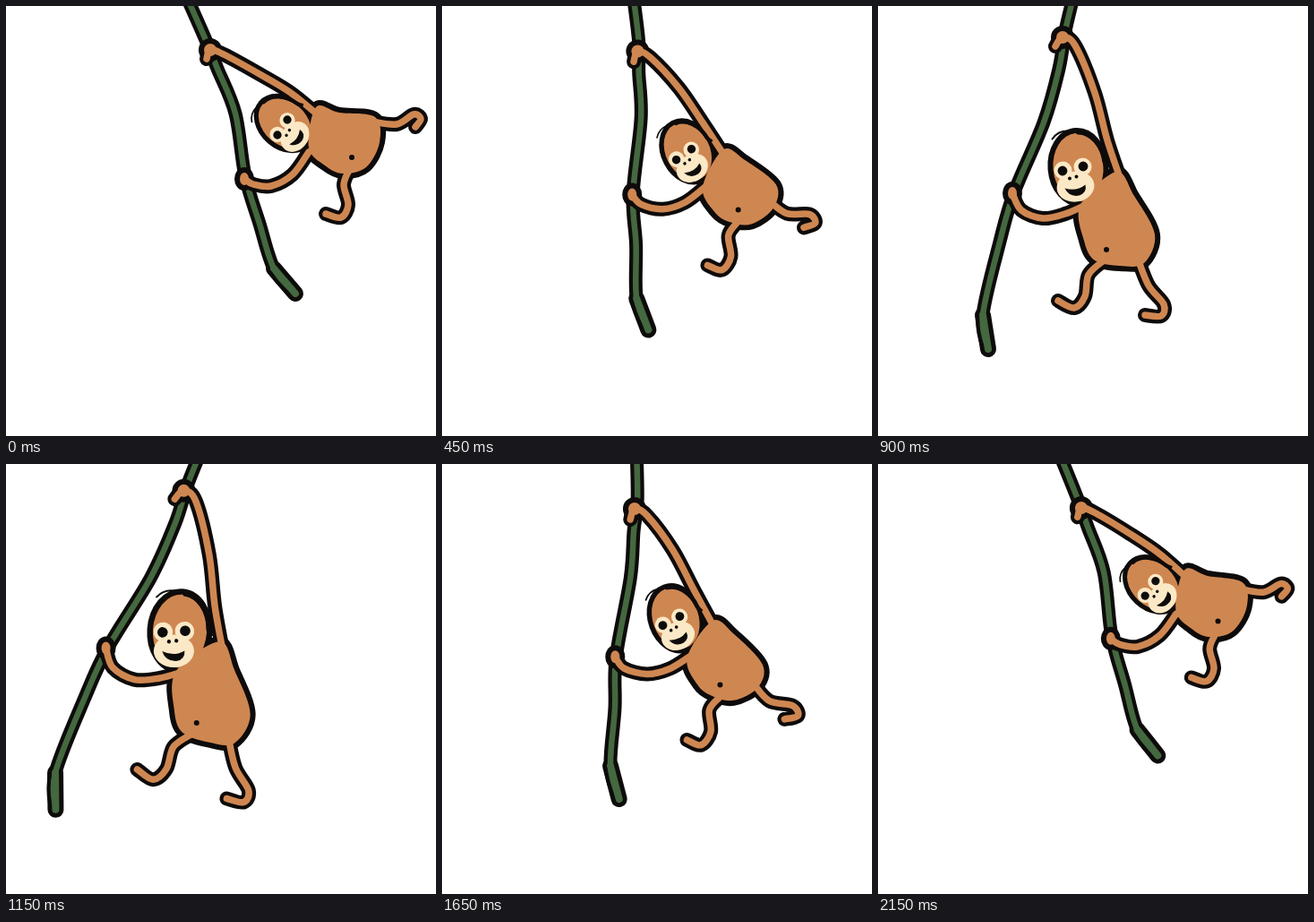
An HTML page with a canvas for the animation above (2200 ms loop, 480x480 px).

```html
<!DOCTYPE html>
<html>
<head>
<meta charset="utf-8">
<style>
html, body { margin: 0; width: 100%; height: 100%; overflow: hidden; background: #fff; }
canvas { display: block; width: 480px; height: 480px; }
</style>
</head>
<body>
<canvas id="stage" width="480" height="480"></canvas>
<script>
const ctx = document.getElementById('stage').getContext('2d');
const BLACK = '#0e0b0b', FUR = '#cf8751', CREAM = '#fbe8c6', GREEN = '#44683f';
const LOOP = 2200, STEP = 50;

// Swing position over time, and the swing positions of the key poses
const TIMES = [0, 250, 650, 900, 1100, 1450, 1850, 2150, 2200];
const SWINGS = [0, 205, 668, 900, 1100, 769, 406, 50, 0];
const KEYS = [0, 668, 900, 1100];

// The far-left pose is the third pose turned and enlarged about the top hand
function farLeft(pts) {
  const c = Math.cos(.192) * 1.1, s = Math.sin(.192) * 1.1;
  return pts.map((v, i) => {
    const j = i - i % 2, x = pts[j] - 207, y = pts[j + 1] - 40;
    return i % 2 ? 34 + x * s + y * c : 196 + x * c - y * s;
  });
}
const part = (right, mid, left) => [right, mid, left, farLeft(left)];

const rope = part(
  [200,-14, 223,38, 236,70, 256,120, 267,190, 283,243, 299,293, 323,321],
  [219,-14, 217,40, 211,75, 204,128, 184,218, 180,275, 172,342, 180,380],
  [219,-14, 209,28, 202,70, 185,130, 152,208, 136,263, 117,345, 123,383]);
const upperArm = part(
  [224,59, 228,49, 243,54, 283,76, 318,97, 352,125],
  [208,61, 213,49, 227,57, 254,98, 276,146, 300,195],
  [198,45, 206,35, 220,44, 242,97, 256,150, 273,200]);
const lowerArm = part(
  [266,193, 276,199, 296,201, 320,188, 338,163],
  [183,217, 193,231, 219,238, 244,233, 268,220],
  [150,209, 160,228, 184,237, 209,232, 232,222]);
const body = part(
  [338,158, 356,178, 376,187, 402,180, 417,152, 412,124, 372,119, 346,113],
  [264,222, 274,254, 290,268, 314,274, 342,262, 349,236, 318,198, 295,182],
  [226,222, 230,262, 242,284, 270,290, 297,287, 309,255, 286,212, 266,185]);
const leftLeg = part(
  [382,185, 377,200, 382,222, 374,236, 357,232],
  [298,270, 286,284, 287,308, 276,323, 260,317],
  [252,284, 235,300, 231,324, 219,337, 201,329]);
const rightLeg = part(
  [408,129, 436,132, 455,121, 463,126, 457,135],
  [338,260, 354,281, 380,289, 385,301, 369,304],
  [290,282, 302,312, 319,333, 316,346, 298,345]);
const eyes = part([303,144, 314,127], [238,184, 258,175], [206,184, 229,179]);
const navel = part([386,169], [299,256], [255,272]);

function swingAt(t) {
  let i = 0;
  while (t >= TIMES[i + 1]) i++;
  const f = (t - TIMES[i]) / (TIMES[i + 1] - TIMES[i]);
  return SWINGS[i] + f * (SWINGS[i + 1] - SWINGS[i]);
}

// Smooth blend of the key poses at swing u, as [x, y] points
function pose(keys, u) {
  let i = 0;
  while (i < 2 && u > KEYS[i + 1]) i++;
  const d = KEYS[i + 1] - KEYS[i], f = (u - KEYS[i]) / d, g = 1 - f;
  const slope = (k, n) => {
    const a = Math.max(k - 1, 0), b = Math.min(k + 1, 3);
    return (keys[b][n] - keys[a][n]) / (KEYS[b] - KEYS[a]) * d;
  };
  const flat = keys[0].map((_, n) =>
    keys[i][n] * (1 + 2 * f) * g * g + slope(i, n) * f * g * g +
    keys[i + 1][n] * (3 - 2 * f) * f * f - slope(i + 1, n) * f * f * g);
  const pts = [];
  for (let n = 0; n < flat.length; n += 2) pts.push([flat[n], flat[n + 1]]);
  return pts;
}

function curve(p, closed) {
  const n = p.length;
  const at = i => closed ? p[(i + n) % n] : p[Math.max(0, Math.min(n - 1, i))];
  const path = new Path2D();
  path.moveTo(...p[0]);
  for (let i = 0; i < (closed ? n : n - 1); i++) {
    const [a, b, c, d] = [at(i - 1), at(i), at(i + 1), at(i + 2)];
    path.bezierCurveTo(b[0] + (c[0] - a[0]) / 6, b[1] + (c[1] - a[1]) / 6,
      c[0] - (d[0] - b[0]) / 6, c[1] - (d[1] - b[1]) / 6, c[0], c[1]);
  }
  return path;
}

function stroke(path, color, width) {
  ctx.strokeStyle = color;
  ctx.lineWidth = width;
  ctx.stroke(path);
}

function fill(path, color) {
  ctx.fillStyle = color;
  ctx.fill(path);
}

function oval(x, y, rx, ry = rx, turn = 0, from = 0, to = 7) {
  const path = new Path2D();
  path.ellipse(x, y, rx, ry, turn, from, Math.min(to, from + 2 * Math.PI));
  return path;
}

function drawFace() {
  for (const [x, y] of [[-11, 2], [11, -2]]) fill(oval(x, y, 10), CREAM);
  fill(oval(3, 20, 21, 17, -.15), CREAM);
  for (const [x, y] of [[-11.5, 2.5], [11.5, -2.5]]) fill(oval(x, y, 5.4), BLACK);
  fill(oval(-3.5, 11, 2), BLACK);
  fill(oval(4, 9, 2), BLACK);
  fill(new Path2D('M-9 22Q4 26 14 18Q16 27 7 30Q-4 32-9 22Z'), BLACK);
}

function draw(u) {
  ctx.clearRect(0, 0, 480, 480);
  ctx.lineCap = ctx.lineJoin = 'round';

  const ropePts = pose(rope, u), vine = curve(ropePts), end = curve(ropePts.slice(-2));
  stroke(vine, BLACK, 15);
  stroke(end, BLACK, 18);
  stroke(vine, GREEN, 6.5);
  stroke(end, GREEN, 8);

  const upper = pose(upperArm, u), lower = pose(lowerArm, u);
  const limbs = [upper, lower, pose(leftLeg, u), pose(rightLeg, u)].map(p => curve(p));
  const torso = curve(pose(body, u), true);
  const hands = [oval(...upper[1], 7), oval(...lower[0], 5, 7)];

  const [a, b] = pose(eyes, u), dx = b[0] - a[0], dy = b[1] - a[1];
  const size = Math.hypot(dx, dy) / 23.5;
  const head = oval(6, -1.5, 28, 38, -.08);
  const inHead = paint => {
    ctx.save();
    ctx.translate((a[0] + b[0]) / 2, (a[1] + b[1]) / 2);
    ctx.rotate(Math.atan2(dy, dx) + .214);
    ctx.scale(size, size);
    paint();
    ctx.restore();
  };

  // Outlines first, so the fur of all parts joins
  for (const limb of limbs) stroke(limb, BLACK, 16);
  for (const shape of [torso, ...hands]) stroke(shape, BLACK, 12);
  inHead(() => {
    stroke(head, BLACK, 12);
    stroke(new Path2D('M-23-33Q-17-42-6-42'), BLACK, 2);
  });

  for (const limb of limbs) stroke(limb, FUR, 7.5);
  for (const shape of [torso, ...hands]) fill(shape, FUR);
  inHead(() => {
    fill(head, FUR);
    stroke(oval(7, -1.5, 29, 39, -.08, -1.5, -.1), BLACK, 5);
    fill(new Path2D('M30-22L41-2L35 1Z'), BLACK);
    drawFace();
  });
  fill(oval(...pose(navel, u)[0], 3), BLACK);
}

const start = performance.now();
function frame() {
  const t = (performance.now() - start) % LOOP;
  draw(swingAt(Math.floor(t / STEP) * STEP));
  requestAnimationFrame(frame);
}
frame();
</script>
</body>
</html>
```
